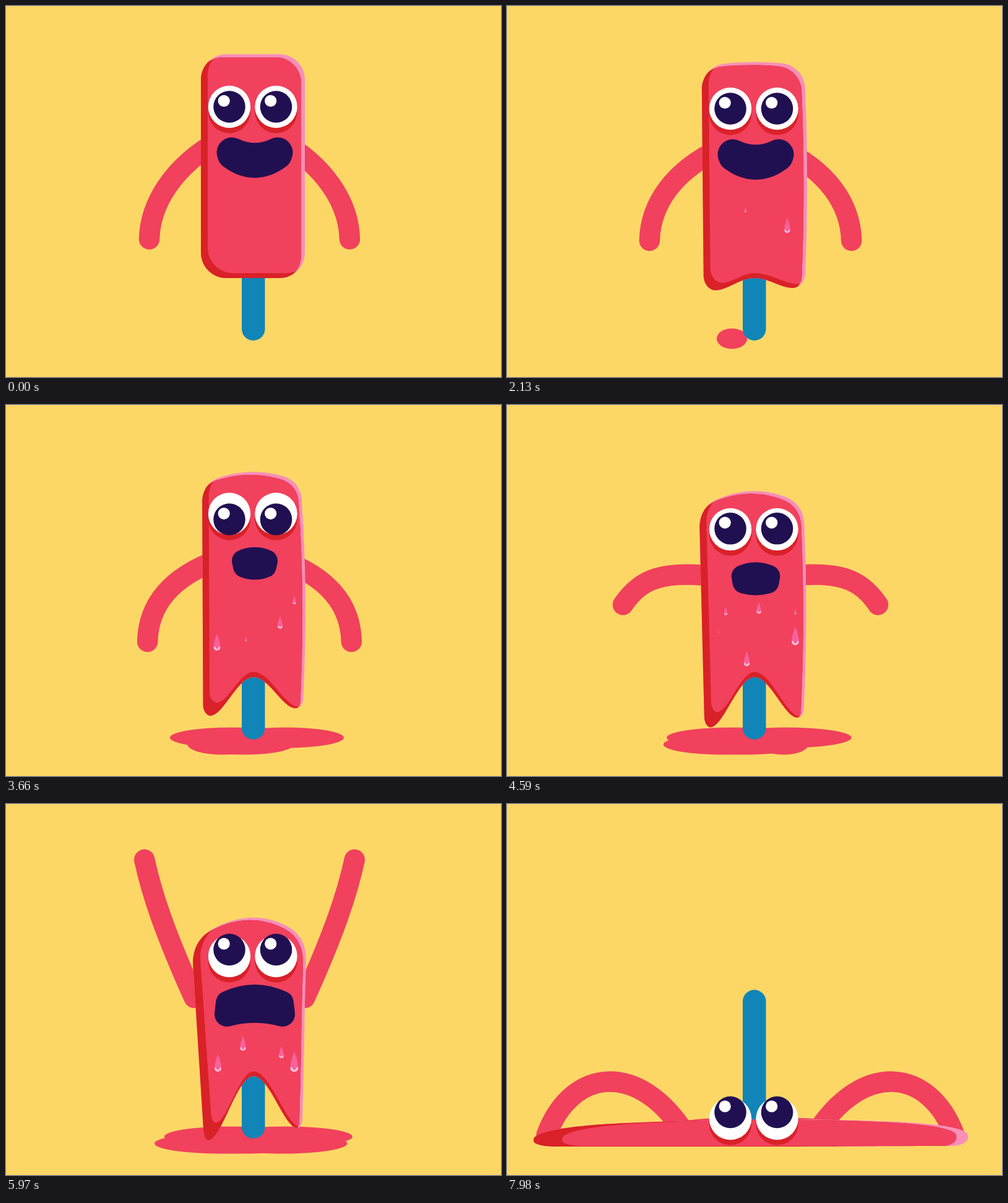
Write an HTML page with a canvas that moves like this. It is 800x600 px and loops after 8 s.

```html
<!DOCTYPE html>
<html lang="en">
<head>
<meta charset="utf-8">
<title>Melting ice lolly</title>
<style>
html, body { margin: 0; width: 100%; height: 100%; overflow: hidden; background: #fdd766; }
canvas { display: block; width: 100vw; height: 100vh; }
</style>
</head>
<body>
<canvas id="stage" width="800" height="600"></canvas>
<script>
const ctx = document.getElementById('stage').getContext('2d');
const LOOP = 8000, REACH_START = 4350, WAVE_START = 4830, FALL_START = 5970, LANDED = 6450;
const BACK = '#fdd766', FLESH = '#f1415d', SHADE = '#d92128', SHINE = '#f78fb9',
      INK = '#211051', STICK = '#1185b7', WHITE = '#fff';

// time, distance the top has sunk, melt from 0 to 1, eye height
const MELT = [
  [0, 0, 0, 163], [2130, 12, .19, 166], [3660, 29, .6, 176],
  [4590, 60, .78, 201], [FALL_START, 105, 1, 246]
];

// hand, two controls, shoulder of the left arm
const ARM = {
  swing: [188, 324, 216, 281, 252, 266, 345, 278],
  reach: [126, 225, 165, 235, 240, 275, 325, 290],
  out: [224.5, 89, 236, 145, 258, 210, 304, 313],
  up: [248, 88, 236, 164, 248, 204, 303, 314],
  fall: [38, 330, 120, 335, 210, 345, 300, 365],
  floor: [64, 535, 104, 427, 213, 414, 289, 535]
};

// half widths above and below, rounding, then corner and control height of both edges
const MOUTH = {
  smile: [37, 36, 24.5, 74, 92, 77, 104],
  gasp: [19, 17, 18, 76, 68, 85, 92],
  wail: [43, 45, 20, 76, 56, 94, 82]
};

// centre, start time, full radius
const PUDDLES = [
  [363.5, 538, 1950, 108], [451.5, 538, 2250, 109], [384.5, 549, 2500, 100],
  [350, 549, 3170, 112], [447, 549, 4290, 115]
];

const SWEAT = [
  [453, 325], [385.5, 331], [341, 339], [443, 336], [466, 313], [387.5, 380],
  [407, 316], [353.5, 331], [466, 336], [342.5, 368], [383, 358], [445, 387]
];

const clamp = v => Math.max(0, Math.min(1, v));
const ramp = (t, from, to) => clamp((t - from) / (to - from));
const smooth = p => p * p * (3 - 2 * p);
const lerp = (a, b, p) => a + (b - a) * p;
const mix = (a, b, p) => a.map((v, i) => Array.isArray(v) ? mix(v, b[i], p) : lerp(v, b[i], p));

function between(keys, t, ease = p => p) {
  const next = keys.findIndex(k => k[0] > t);
  if (next < 0) return keys[keys.length - 1].slice(1);
  const a = keys[next - 1], b = keys[next];
  return mix(a.slice(1), b.slice(1), ease(ramp(t, a[0], b[0]), next));
}

function stateAt(t) {
  const slowStart = (p, next) => next === 1 ? p ** 2.2 : p;
  const [sink, melt, eye] = between(MELT, t, slowStart);
  const fall = ramp(t, FALL_START, LANDED) ** 2;
  return { t, sink, melt, fall, eye: lerp(eye, 509, fall) };
}

// Clockwise from the left: left, top left, top right, right, right base, right tip,
// left tip, left base; then dome slope, bulge of the right side, notch height.
function standingBody({ sink, melt }) {
  const top = 78 + sink, early = melt ** .25, late = melt ** .75;
  return [[
    [315 + 17.5 * melt - .29 * sink, 119 + 1.33 * sink],
    [356 - 16 * melt, top + 16 * melt],
    [442 + 11 * melt, top + 14 * melt],
    [483 - 17.3 * melt + .184 * sink, 119 + 1.27 * sink],
    [483 - 4 * melt, 399 + 109 * late],
    [442 + 29 * early, 440 + 84 * melt],
    [356 - 29 * early, 440 + 104 * melt],
    [315 + 4 * early, 399 + 126 * late]
  ], [.5 * melt, 26 * melt * (1 - melt), 440]];
}

function flatBody({ t }) {
  const inset = 4 * (1 - ramp(t, LANDED, LOOP));
  const left = 43 + inset, right = 745 - inset, top = 510, floor = 554;
  return [[
    [left, floor - 11], [left + 147, top + 6], [right - 115, top + 4], [right, floor - 18],
    [right, floor - 14], [right - 26, floor - 1], [left + 34, floor], [left, floor - 9]
  ], [.045, 0, floor]];
}

const shift = (points, dx, dy) => points.map(([x, y]) => [x + dx, y + dy]);

function bodyPath(points, [slope, bulge, notch]) {
  const [[lx, ly], [ax, ay], [bx, by], [rx, ry],
         [rbx, rby], [rtx, rty], [ltx, lty], [lbx, lby]] = points;
  const K = .55, reach = (bx - ax) / 3, da = (ax - lx) * K, db = (rx - bx) * K;
  const side = (rx + rbx) / 2 + bulge, third = (rby - ry) / 3, mid = 400;
  const p = new Path2D();
  p.moveTo(lx, ly);
  p.bezierCurveTo(lx, lerp(ly, ay, K), ax - da, ay + slope * da, ax, ay);
  p.bezierCurveTo(ax + reach, ay - slope * reach, bx - reach, by - slope * reach, bx, by);
  p.bezierCurveTo(bx + db, by + slope * db, rx, lerp(ry, by, K), rx, ry);
  p.bezierCurveTo(side, ry + third, side, rby - third, rbx, rby);
  p.bezierCurveTo(rbx, lerp(rby, rty, K), lerp(rtx, rbx, K), rty, rtx, rty);
  p.bezierCurveTo(lerp(rtx, mid, .3), rty, lerp(mid, rtx, .37), notch, mid, notch);
  p.bezierCurveTo(lerp(mid, ltx, .37), notch, lerp(ltx, mid, .3), lty, ltx, lty);
  p.bezierCurveTo(lerp(ltx, lbx, K), lty, lbx, lerp(lby, lty, K), lbx, lby);
  p.closePath();
  return p;
}

function fillPath(path, color) {
  ctx.fillStyle = color;
  ctx.fill(path);
}

function ellipse(x, y, rx, ry, color) {
  ctx.fillStyle = color;
  ctx.beginPath();
  ctx.ellipse(x, y, rx, ry, 0, 0, 7);
  ctx.fill();
}
const disc = (x, y, r, color) => ellipse(x, y, r, r, color);

function drawPuddles(t) {
  const lift = 14 * ramp(t, 6200, 6420);
  for (const [x, y, start, full] of PUDDLES) {
    if (t <= start) continue;
    const r = full * (1 - Math.exp((start - t) / 700));
    ellipse(x, y - lift, r, 16.5 * Math.min(1, r / 24), FLESH);
  }
}

function hangingArm(sink) {
  const x = 231.5 - .1 * sink, y = 377 + .2 * sink;
  return [x, y, x + 1.5, y - 59, 272 - .24 * sink, 258 + .7 * sink, 345, 217 + 1.12 * sink];
}

function wavingArm(t, eye) {
  const swing = (1 - Math.cos((t - WAVE_START) / (FALL_START - WAVE_START) * 2 * Math.PI)) / 2;
  return mix(ARM.out, ARM.up, swing).map((v, i) => i % 2 ? v + .8 * (eye - 246) : v);
}

function armAt({ t, sink, eye }) {
  if (t < REACH_START) return hangingArm(sink);
  if (t >= WAVE_START && t < FALL_START) return wavingArm(t, eye);
  return between([
    [REACH_START, ...hangingArm(52)], [4590, ...ARM.swing], [4700, ...ARM.reach],
    [WAVE_START, ...wavingArm(WAVE_START, 209)],
    [FALL_START, ...ARM.out], [6200, ...ARM.fall], [LANDED, ...ARM.floor]
  ], t);
}

function drawArms(state) {
  const arm = armAt(state);
  const mirrored = arm.map((v, i) => i % 2 ? v : 787 - v);
  ctx.strokeStyle = FLESH;
  ctx.lineWidth = 33.5;
  ctx.lineCap = 'round';
  for (const [x, y, ...curve] of [arm, mirrored]) {
    ctx.beginPath();
    ctx.moveTo(x, y);
    ctx.bezierCurveTo(...curve);
    ctx.stroke();
  }
}

function drawStick() {
  ctx.fillStyle = STICK;
  ctx.beginPath();
  ctx.roundRect(381, 300.5, 37.5, 240.5, 18.75);
  ctx.fill();
}

function drawSweat(t) {
  const visible = 1 - ramp(t, 5990, 6100);
  SWEAT.forEach(([x, y], i) => {
    const start = 800 + 4100 * (i / (SWEAT.length - 1)) ** .65;
    const age = (t - start) / 1000;
    if (age <= 0 || age >= 2) return;
    const size = 18 * age, r = size * .2, low = y + 20 * age ** 2.6, cy = low - r;
    const tip = low - size, neck = low - size * .75;
    ctx.globalAlpha = visible * (1 - ramp(age, 1.85, 2));
    ctx.fillStyle = '#f7619b';
    ctx.beginPath();
    ctx.moveTo(x, tip);
    ctx.bezierCurveTo(x + r * .5, neck, x + r, cy - r, x + r, cy);
    ctx.arc(x, cy, r, 0, Math.PI);
    ctx.bezierCurveTo(x - r, cy - r, x - r * .5, neck, x, tip);
    ctx.fill();
    ctx.strokeStyle = '#fbc3d6';
    ctx.lineWidth = r * .5;
    ctx.beginPath();
    ctx.arc(x, cy, r * .72, .1, Math.PI - .1);
    ctx.stroke();
  });
  ctx.globalAlpha = 1;
}

// A curved quad, rounded off by a thick outline.
function drawMouth({ t, eye }) {
  const size = 1 - ramp(t, 6050, 6380);
  if (!size) return;
  const calm = mix(MOUTH.smile, MOUTH.gasp, smooth(ramp(t, 2500, 2700)));
  const [wideTop, wideLow, r, top, topBend, low, lowBend] =
    mix(calm, MOUTH.wail, smooth(ramp(t, 4500, 5000)));
  ctx.save();
  ctx.translate(402, Math.min(eye + 80, 530));
  ctx.scale(size, size);
  ctx.translate(0, -80);
  ctx.fillStyle = ctx.strokeStyle = INK;
  ctx.lineWidth = 2 * r;
  ctx.lineJoin = 'round';
  ctx.beginPath();
  ctx.moveTo(-wideTop, top);
  ctx.quadraticCurveTo(0, topBend, wideTop, top);
  ctx.lineTo(wideLow, low);
  ctx.quadraticCurveTo(0, lowBend, -wideLow, low);
  ctx.closePath();
  ctx.fill();
  ctx.stroke();
  ctx.restore();
}

function drawBody(state) {
  const { t, melt, fall } = state;
  const [points, form] = mix(standingBody(state), flatBody(state), fall);
  const [slope, bulge, notch] = form;
  const wide = (points[3][0] - points[0][0]) / 168;
  const tall = (points[6][1] - points[1][1]) / 362;
  const outer = bodyPath(points, form);

  const litY = (5 - melt) * tall;
  const lit = shift(points, (1.5 * melt - 6) * wide, litY);
  lit[6][0] = points[6][0];
  const litPath = bodyPath(lit, [slope, bulge, notch + litY]);

  const frontY = -8 * tall, lift = 21 * melt * (1 - fall);
  const front = shift(points, 11 * wide, frontY);
  const legs = Math.min(1, 1.5 * melt);
  front[5][0] -= 7 * legs;
  front[5][1] += 6 * legs * tall;
  front[6][1] -= lift;
  front[7][1] -= lift;
  const frontPath = bodyPath(front, [slope, bulge, notch + frontY]);

  fillPath(outer, SHINE);
  ctx.save();
  ctx.clip(outer);
  fillPath(litPath, SHADE);
  ctx.save();
  ctx.clip(litPath);
  fillPath(frontPath, FLESH);
  ctx.restore();
  drawSweat(t);
  drawMouth(state);
  ctx.restore();
}

function drawEyes({ t, eye }) {
  const down = 9 * (smooth(ramp(t, 2500, 2700)) - smooth(ramp(t, 4200, 4400)));
  const look = down - 10.5 * smooth(ramp(t, 4480, 5000));
  for (const x of [361, 436.5]) {
    disc(x, eye + 8.5, 34.2, SHADE);
    disc(x, eye, 34.2, WHITE);
    disc(x, eye + look, 25.8, INK);
    disc(x - 8.8, eye + look - 9.5, 9.6, WHITE);
  }
}

function draw(t) {
  const state = stateAt(t);
  ctx.fillStyle = BACK;
  ctx.fillRect(0, 0, 800, 600);
  drawPuddles(t);
  drawArms(state);
  drawStick();
  drawBody(state);
  drawEyes(state);
}

const begin = performance.now();
function tick() {
  draw((performance.now() - begin) % LOOP);
  requestAnimationFrame(tick);
}
tick();
</script>
</body>
</html>
```
